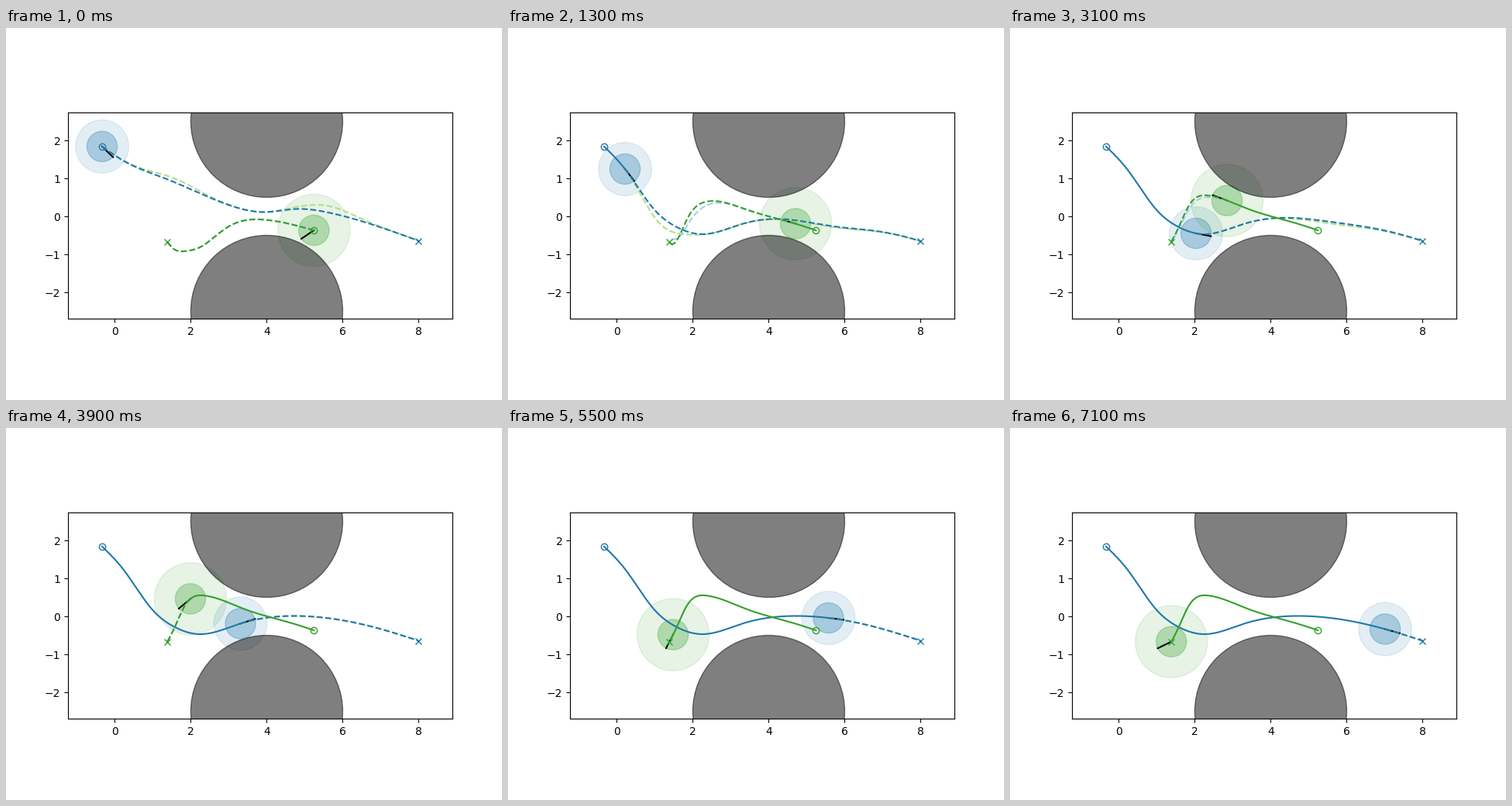
Write a matplotlib script that moves like this. It is 640 by 480 pixels and loops after 7.2 s.

```python
import numpy as np
import matplotlib.pyplot as plt
from matplotlib.animation import FuncAnimation

FRAMES, INTERVAL = 72, 100
SCALE = 49.0               # pixels per data unit
ORIGIN = 140.4, 243.5      # where layout pixels place (0, 0)

BLUE, LIGHT_BLUE = "#1f78ac", "#a6cee3"
GREEN, LIGHT_GREEN = "#33a02c", "#b2df8a"


def to_data(x, y):
    return (x - ORIGIN[0]) / SCALE, (ORIGIN[1] - y) / SCALE


def ease(t, start, end):
    """Smooth step from 0 at start to 1 at end (end may come first)."""
    u = np.clip((t - start) / (end - start), 0, 1)
    return u * u * (3 - 2 * u)


def bell(x, center, width):
    return np.exp(-((x - center) / width) ** 2)


def hump(d, peak, power):
    """Rises from 0 at d = 0 to 1 at d = peak, then fades out."""
    u = np.maximum(d, 0) / peak
    return (u * np.exp(1 - u)) ** power


def spline(*points):
    """Natural cubic spline y(x) through the points."""
    x, y = np.array(points, float).T
    h, slope = np.diff(x), np.diff(y) / np.diff(x)
    a = np.eye(len(x))
    b = np.zeros(len(x))
    for i in range(1, len(x) - 1):
        a[i, i - 1:i + 2] = h[i - 1], 2 * (h[i - 1] + h[i]), h[i]
        b[i] = 6 * (slope[i] - slope[i - 1])
    m = np.linalg.solve(a, b)

    def curve(t):
        i = np.clip(np.searchsorted(x, t, side="right") - 1, 0, len(h) - 1)
        d = t - x[i]
        return (y[i] + d * (slope[i] - h[i] * (2 * m[i] + m[i + 1]) / 6)
                + d ** 2 * m[i] / 2 + d ** 3 * (m[i + 1] - m[i]) / (6 * h[i]))
    return curve


class Agent:
    """Disc that follows `final` while its plan bends from `first` to it.

    plan and guess are (early offset, evasive offset, relax start, relax end);
    turns are (heading, frame where free, frame where reached).
    """

    def __init__(self, ax, first, final, plan, guess, stops, goal, turns,
                 reach, color, light):
        self.first, self.final, self.goal = first, final, goal
        self.options = plan, guess
        n = np.arange(FRAMES)
        self.x = spline(*stops)(n)
        self.y = final(self.x)

        way = np.sign(goal - self.x[0])
        self.angle = np.arctan2(way * (final(self.x - 1) - final(self.x + 1)) / 2, way)
        self.angle %= 2 * np.pi
        for heading, free, reached in turns:
            w = ease(n, free, reached)
            self.angle += w * (np.radians(heading) - self.angle)

        self.discs = [ax.add_patch(plt.Circle((0, 0), r, color=color, alpha=a))
                      for r, a in ((0.4, 0.3), (reach, 0.12))]
        self.heading, = ax.plot([], [], color="k")
        self.guess, = ax.plot([], [], "--", color=light, zorder=2.1)
        self.plan, = ax.plot([], [], "--", color=color, zorder=2.2)
        self.trail, = ax.plot([], [], color=color, zorder=2.3)
        for x, marker in ((self.x[0], "o"), (goal, "x")):
            ax.plot(*to_data(x, final(x)), marker, color=color, mfc="none", zorder=2.4)

    def ahead(self, option, n):
        """Remaining part of a plan, bent to begin at the agent."""
        early, evade, relax, settled = option
        x = np.linspace(self.x[n], self.goal, 250)
        swap, calm = ease(n, 0, 9), ease(n, relax, settled)
        y = ((1 - swap) * (self.first(x) + early(x))
             + swap * (self.final(x) + (1 - calm) * evade(x)))
        fade = np.exp(-abs(x - x[0]) / 20) * np.minimum(abs(self.goal - x) / 6, 1)
        return to_data(x, y + (self.y[n] - y[0]) * fade)

    def update(self, n):
        x, y = to_data(self.x[n], self.y[n])
        for disc in self.discs:
            disc.center = x, y
        a = self.angle[n]
        self.heading.set_data([x, x + 0.4 * np.cos(a)], [y, y + 0.4 * np.sin(a)])
        driven = np.linspace(self.x[0], self.x[n], 250)
        self.trail.set_data(*to_data(driven, self.final(driven)))
        for line, option in zip((self.plan, self.guess), self.options):
            line.set_data(*self.ahead(option, n))


fig, ax = plt.subplots(figsize=(6.4, 4.8), dpi=100)
ax.set_aspect("equal")
for cy in (2.5, -2.5):
    ax.add_patch(plt.Circle((4, cy), 2, color="k", alpha=0.5, zorder=1.5))

blue = Agent(
    ax,
    first=spline((124, 153.4), (151, 171.5), (205, 194.5), (285, 228), (335, 238),
                 (374, 234), (413, 238), (532.4, 275)),
    final=spline((124, 153.4), (151, 182.5), (188, 234), (217, 257), (250, 266.5),
                 (302, 253), (374, 243), (484, 260), (532.4, 275)),
    plan=(lambda x: 0 * x,
          lambda x: 10 * bell(x, 420, 65), 23, 39),
    guess=(lambda x: -5 * bell(x, 220, 40) - 8.5 * bell(x, 418, 40),
           lambda x: 11 * bell(x, 420, 65) + 11 * bell(x, 200, 30), 26, 39),
    stops=[(0, 124), (13, 151), (23, 188), (31, 240), (39, 302.5), (55, 413.5),
           (71, 484)],
    goal=532.4, turns=[], reach=0.7, color=BLUE, light=LIGHT_GREEN)

GOAL = 208
green = Agent(
    ax,
    first=spline((GOAL, 276.5), (217, 286), (230, 288.5), (250, 283.5), (285, 258),
                 (335, 248), (397.3, 261.5)),
    final=spline((GOAL, 276.5), (217, 259), (230, 231), (255, 216.6), (285, 225),
                 (310, 235), (371, 253), (397.3, 261.5)),
    plan=(lambda x: 0 * x,
          lambda x: 20 * hump(x - GOAL, 16, 1), 11, 28),
    guess=(lambda x: 0 * x,
           lambda x: 26 * hump(x - GOAL, 23, 2), 18, 36),
    stops=[(0, 397.3), (13, 371), (23, 327.5), (31, 280), (39, 238), (55, 213),
           (71, GOAL + 0.2)],
    goal=GOAL, turns=[(214, 8, 0), (206, 55, 71)], reach=0.95, color=GREEN,
    light=LIGHT_BLUE)

ax.set_xlim(-1.233, 8.889)
ax.set_ylim(-2.7, 2.725)


def update(n):
    for agent in (blue, green):
        agent.update(n)
    return []


anim = FuncAnimation(fig, update, frames=FRAMES, interval=INTERVAL,
                     init_func=lambda: update(0), repeat=True, repeat_delay=0)
plt.show()
```
